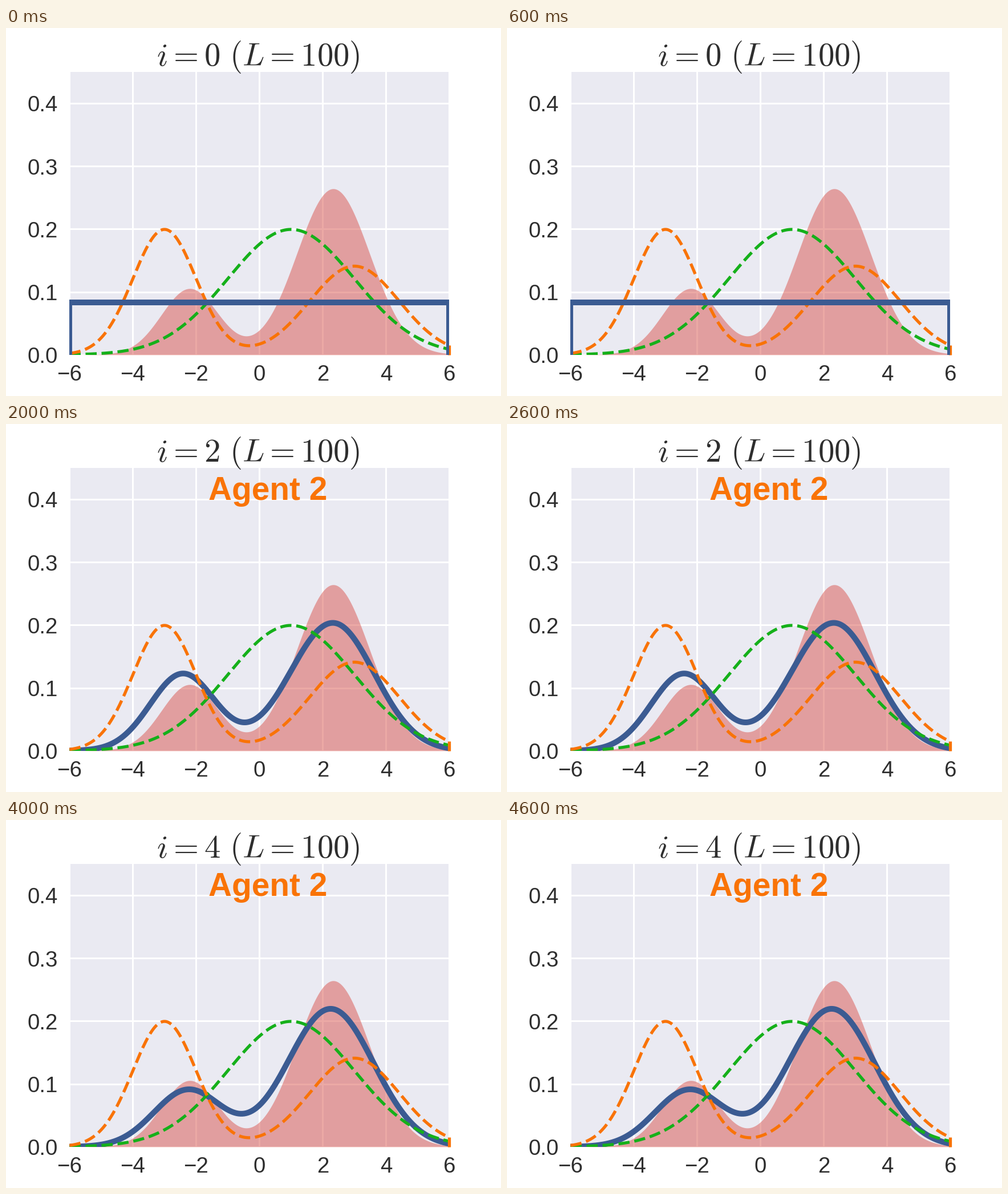
These frames come from a looping animation (868x645 px, 5 s). A matplotlib script:

```python
import matplotlib.pyplot as plt
import numpy as np
from matplotlib.animation import FuncAnimation

W, H, DPI = 868, 645, 64
PT = 72 / DPI  # points per pixel
LEFT, RIGHT, TOP, BOTTOM = 111.4, 777.4, 77, 572.8

GREEN, ORANGE = "xkcd:green", "xkcd:orange"
BLUE, RED = "xkcd:denim blue", "xkcd:pale red"
INK = "0.18"
DASH_WIDTH = 5.3

plt.rcParams.update({"font.family": "Liberation Sans", "mathtext.fontset": "cm"})


def bell(x, height, mean, sd, sd_right=None):
    """Gaussian bump, optionally with another spread right of the mean."""
    spread = np.where(x < mean, sd, sd_right or sd)
    return height * np.exp(-0.5 * ((x - mean) / spread) ** 2)


def normal(x, mean, var):
    return bell(x, 1 / np.sqrt(2 * np.pi * var), mean, np.sqrt(var))


def smooth(x, kx, ky):
    """Cubic Hermite curve through a few knots."""
    kx, ky = np.array(kx), np.array(ky)
    m = np.gradient(ky, kx)
    i = np.clip(np.searchsorted(kx, x, side="right") - 1, 0, len(kx) - 2)
    h = kx[i + 1] - kx[i]
    t = (x - kx[i]) / h
    return ((1 + 2 * t) * (1 - t) ** 2 * ky[i] + t * (1 - t) ** 2 * h * m[i]
            + t * t * (3 - 2 * t) * ky[i + 1] + t * t * (t - 1) * h * m[i + 1])


x = np.linspace(-6, 6, 601)
agent1 = normal(x, 1, 4)
agent2 = 0.5 * normal(x, -3, 1) + 0.5 * normal(x, 3, 2)
product = agent1 * agent2
product /= product.sum() * (x[1] - x[0])

first = smooth(
    x,
    [-6, -5, -4.5, -4, -3.5, -3, -2.7, -2, -1.7, -1.1,
     -0.7, 0, 0.5, 1.1, 1.6, 2, 3, 4, 5, 6],
    [0.002, 0.0055, 0.0095, 0.020, 0.037, 0.052, 0.062, 0.093, 0.102, 0.1155,
     0.128, 0.157, 0.171, 0.1775, 0.172, 0.160, 0.1105, 0.061, 0.026, 0.009])

box = ([-6, -6, 6, 6], [0, 1 / 12, 1 / 12, 0])
estimates = [
    box,
    (x, first),
    (x, bell(x, 0.1225, -2.42, 1.03) + bell(x, 0.2035, 2.32, 1.36, 1.31)),
    (x, bell(x, 0.0725, -2.10, 1.15) + bell(x, 0.2220, 2.18, 1.42)),
    (x, bell(x, 0.0905, -2.25, 1.08) + bell(x, 0.2195, 2.25, 1.36)),
]

fig = plt.figure(figsize=(W / DPI, H / DPI), dpi=DPI, facecolor="white")
ax = fig.add_axes([LEFT / W, 1 - BOTTOM / H, (RIGHT - LEFT) / W, (BOTTOM - TOP) / H],
                  facecolor="#EAEAF2")
ax.set(xlim=(-6, 6), ylim=(0, 0.45))
ax.set_xticks(range(-6, 7, 2))
ax.set_yticks(np.arange(5) / 10)
ax.set_axisbelow(True)
ax.grid(color="white", linewidth=3 * PT)
ax.tick_params(length=0, labelbottom=False, labelleft=False)
for spine in ax.spines.values():
    spine.set_visible(False)


def label(px, py, text, size, **style):
    style = {"color": INK, "ha": "center", "va": "baseline", **style}
    return fig.text(px / W, 1 - py / H, text, fontsize=size * PT, **style)


for v in range(-6, 7, 2):
    px = LEFT + (v + 6) / 12 * (RIGHT - LEFT)
    label(px, 618.5, str(v).replace("-", "\u2212"), 38.5)
for k in range(5):
    py = BOTTOM - k / 4.5 * (BOTTOM - TOP)
    label(91, py + 14.3, f"{k / 10:.1f}", 38.5, ha="right")

ax.fill_between(x, product, color=RED, alpha=0.5, linewidth=0, zorder=1)
for curve, color in ((agent1, GREEN), (agent2, ORANGE)):
    ax.plot(x, curve, "--", color=color, linewidth=DASH_WIDTH * PT, zorder=4)
ax.plot([6, 6], [0, agent2[-1]], color=ORANGE, linewidth=DASH_WIDTH * PT,
        solid_capstyle="butt", clip_on=False, zorder=4)

estimate, = ax.plot([], [], color=BLUE, linewidth=10 * PT, solid_joinstyle="miter")
title = label(442, 66, "", 56.7)
agent = label(354.8, 133.3, "", 56.7, ha="left", weight="bold")


def draw(i):
    estimate.set_data(*estimates[i])
    estimate.set_zorder(3 if i else 5)
    title.set_text(r"$i=%d\ (L=100)$" % i)
    who = 2 - i % 2
    agent.set_text(f"Agent {who}" if i else "")
    agent.set_color(GREEN if who == 1 else ORANGE)
    return estimate, title, agent


anim = FuncAnimation(fig, draw, frames=5, interval=1000, repeat=True)
plt.show()
```
